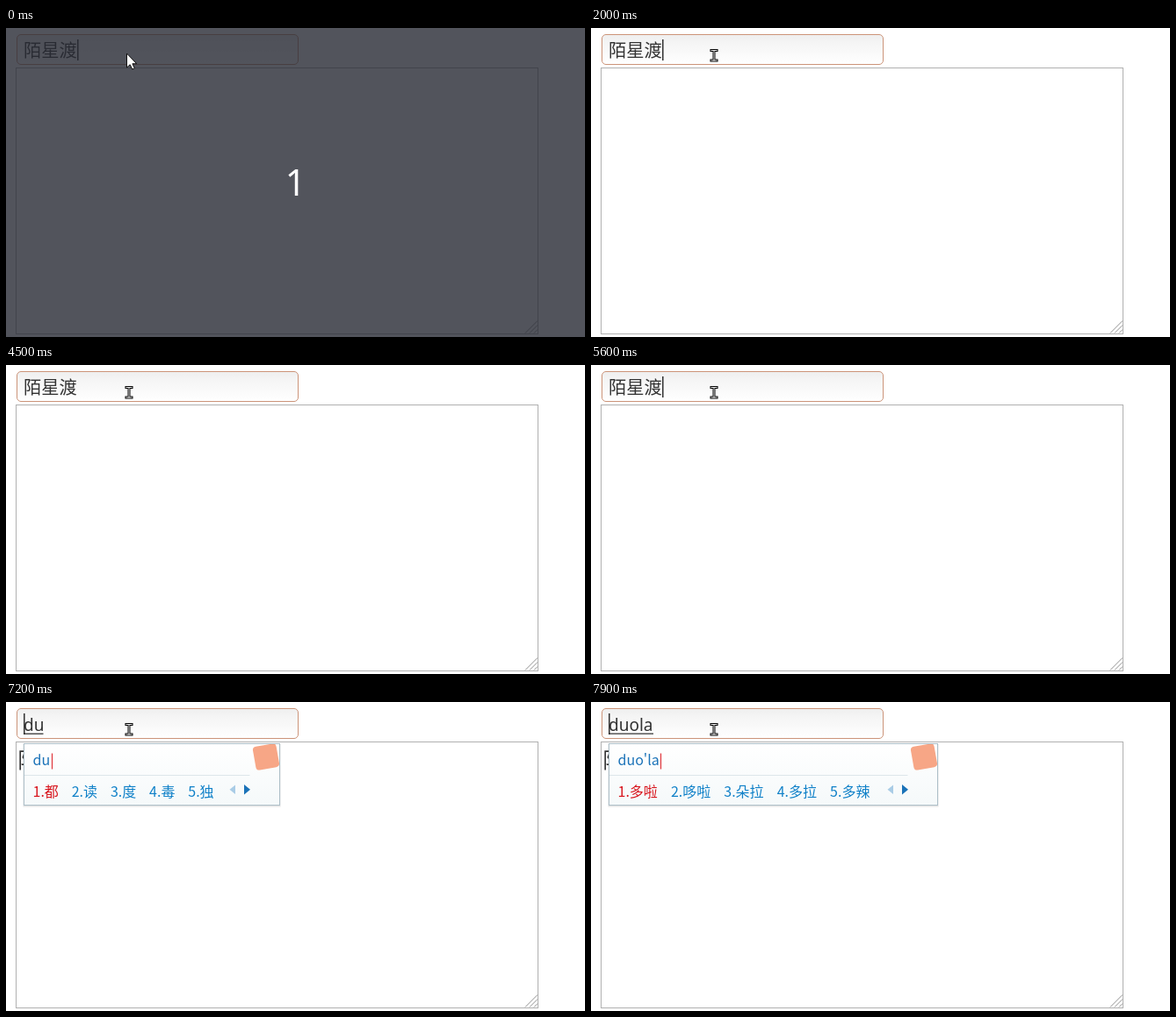
An HTML page that plays this animation: 659x352 px, repeating every 8000 ms.

```html
<!DOCTYPE html>
<html lang="zh-CN">
<head>
<meta charset="utf-8">
<title>Input demo</title>
<style>
html, body { margin: 0; width: 100%; height: 100%; overflow: hidden; background: #fff; }
svg { display: block; }
text { font-family: "Noto Sans CJK SC", "Noto Sans CJK", "Noto Sans", sans-serif; white-space: pre; }
.latin { font-family: "Noto Sans", "Open Sans", sans-serif; }
.ink { fill: #333; }
.ime { font-size: 16px; fill: #1a72b8; }
.cand { fill: #0f80c8; }
.cand:first-child { fill: #d8141c; }
</style>
</head>
<body>
<svg width="659" height="352" viewBox="0 0 659 352">
  <defs>
    <linearGradient id="field" x2="0" y2="1">
      <stop offset="0" stop-color="#efefef"/><stop offset=".3" stop-color="#f5f5f5"/><stop offset="1" stop-color="#fff"/>
    </linearGradient>
    <linearGradient id="panel" x2="0" y2="1">
      <stop offset="0" stop-color="#fff"/><stop offset="1" stop-color="#f5f9fa"/>
    </linearGradient>
    <clipPath id="clip"><rect id="clipBox" x="21" y="48" width="10" height="70"/></clipPath>
  </defs>

  <rect x="12.5" y="7.5" width="320" height="34" rx="4.5" fill="url(#field)" stroke="#cc9479"/>
  <text id="title" class="ink" x="20" y="32.7" font-size="20.3"></text>
  <text id="typed" class="ink latin" x="20" y="32.5" font-size="19"></text>
  <path id="line" stroke="#333" stroke-width="1.3"/>
  <path id="caret" stroke="#222" stroke-width="1.4"/>

  <rect x="11.5" y="45.5" width="594" height="303" fill="none" stroke="#b0b0b0"/>
  <path d="M591 347.500L605 333.500M596 347.500L605 338.500M601 347.500L605 343.500" stroke="#909090" fill="none"/>
  <text id="area" class="ink" x="13.500" y="74.500" font-size="24"></text>

  <g id="popup">
    <rect id="shade" x="20.500" y="48.500" height="70" fill="none" stroke="#000" stroke-opacity=".1" stroke-width="2"/>
    <rect id="frame" x="20.500" y="47.500" height="70" fill="url(#panel)" stroke="#adbfc8"/>
    <path id="rule" stroke="#dde6ea"/>
    <g clip-path="url(#clip)"><rect id="badge" y="49" width="27" height="27" rx="4" fill="#f7a686"/></g>
    <text id="pre" class="ime" x="30.500" y="71.800"></text>
    <path id="mark" stroke="#e0343a" stroke-width="1.200"/>
    <g id="list"></g>
    <path id="prev" fill="#a9cce6"/>
    <path id="next" fill="#1a72b8"/>
  </g>

  <g id="beam" fill="none" stroke-linecap="square">
    <path d="M137 25.500H143M140 25.500V37M137 37H143" stroke="#000" stroke-width="3"/>
    <path d="M137 25.500H143M140 25.500V37M137 37H143" stroke="#fff" stroke-width=".9"/>
  </g>

  <g id="cover">
    <rect width="659" height="352" fill="#272a34" fill-opacity=".8"/>
    <text class="latin" x="329.500" y="191" font-size="41" fill="#fff" text-anchor="middle">1</text>
    <path d="M137.500 29V45L141.200 41.700L143.700 47L146.300 45.800L143.900 40.700H148.700Z" fill="#fff" stroke="#111"/>
  </g>
</svg>
<script>
const LOOP = 8000;
const TITLE = "陌星渡";
const $ = id => document.getElementById(id);

// input method panels: reading, caret x, right edge, candidate pitch, candidates
const panels = {
  d: ["d", 42.5, 311.5, 44.2, "的 都 大 到 对"],
  du: ["du", 52.5, 311.5, 44.2, "都 读 度 毒 独"],
  duo: ["duo", 62.5, 326.5, 44.2, "多 躲 朵 夺 duo"],
  duol: ["duo'l", 69.5, 394.5, 60.4, "多了 多啦 朵拉 多来 多拉"],
  duola: ["duo'la", 79.5, 394.5, 60.4, "多啦 哆啦 朵拉 多拉 多辣"]
};
const lineEnd = { d: 31.5, du: 42.5, duo: 54, duol: 59, duola: 71 };

// time, caret x (0 = hidden), typed text, panel
const steps = [
  [0, 81.8], [800, 0], [2000, 81.8], [3200, 0], [4200, 81.8], [4500, 0], [5600, 81.8],
  [6100, 20.8], [6900, 0],
  [7000, 20.8, "d", "d"], [7200, 20.8, "du", "du"],
  [7400, 20.8, "duo", "du"], [7500, 20.8, "duo", "duo"],
  [7700, 20.8, "duol", "duo"], [7800, 20.8, "duol", "duol"], [7900, 20.8, "duola", "duola"]
];

const show = (id, on) => { $(id).style.display = on ? "" : "none"; };
const path = (id, d) => $(id).setAttribute("d", d);

function drawPanel(key) {
  show("popup", key);
  if (!key) return;
  const [reading, mark, right, pitch, words] = panels[key];
  for (const id of ["frame", "shade"]) $(id).setAttribute("width", right - 20.5);
  $("clipBox").setAttribute("width", right - 21);
  $("badge").setAttribute("x", right - 29);
  $("badge").setAttribute("transform", `rotate(-10 ${right - 15.5} 62.5)`);
  path("rule", `M21 83.5H${right - 34}`);
  $("pre").textContent = reading;
  path("mark", `M${mark} 58.5V76.5`);
  $("list").innerHTML = words.split(" ").map((word, i) =>
    `<text class="ime cand" x="${30.5 + i * pitch}" y="107.800">${i + 1}.${word}</text>`).join("");
  path("prev", `M${right - 50.5} 94.5V105L${right - 57} 99.700Z`);
  path("next", `M${right - 40.5} 94V105.500L${right - 33.5} 99.700Z`);
}

let last = null;
function draw(now) {
  const t = now % LOOP;
  const covered = t < 100;
  show("cover", covered);
  show("beam", !covered);
  const step = steps.findLast(s => s[0] <= t);
  if (step !== last) {
    last = step;
    const [start, caret, typed = "", panel] = step;
    const sent = start >= 6100;
    $("title").textContent = sent ? "" : TITLE;
    $("area").textContent = sent ? TITLE : "";
    $("typed").textContent = typed;
    path("line", typed ? `M20 36.2H${lineEnd[typed]}` : "");
    path("caret", caret ? `M${caret} 13V37` : "");
    drawPanel(panel);
  }
  requestAnimationFrame(() => draw(performance.now() - origin));
}
const origin = performance.now();
draw(0);
</script>
</body>
</html>
```
